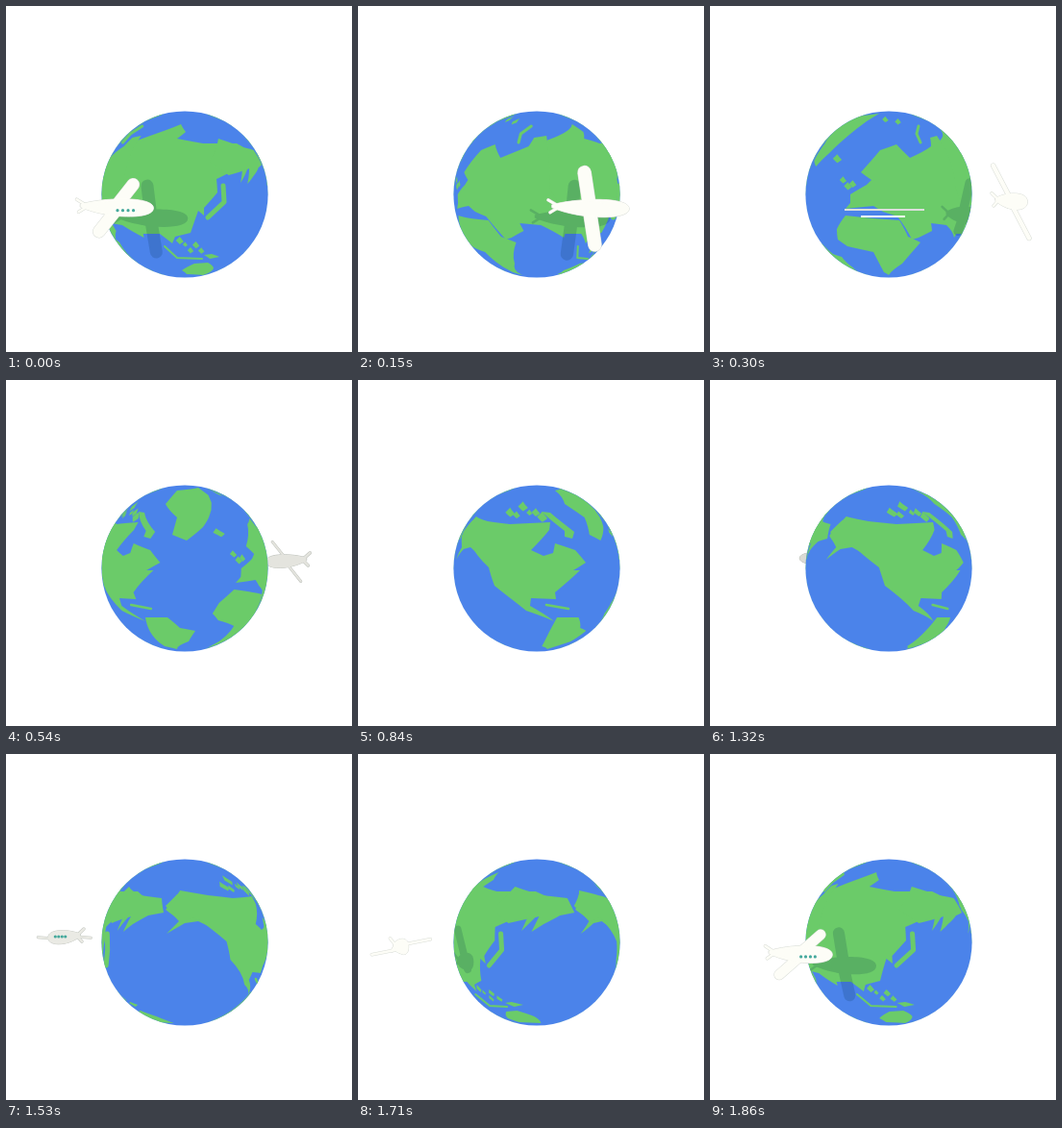
Recreate the animation shown at these times as an HTML page with a canvas. Size 360x360 px, loop 1890 ms.

```html
<!DOCTYPE html>
<html lang="en">
<head>
<meta charset="utf-8">
<title>Plane around the globe</title>
<style>
html, body { margin: 0; width: 100%; height: 100%; overflow: hidden; background: #fff; }
canvas { display: block; }
</style>
</head>
<body>
<canvas id="stage" width="360" height="360"></canvas>
<script>
const ctx = document.getElementById('stage').getContext('2d');
const layer = document.createElement('canvas');
layer.width = layer.height = 360;
const shadowCtx = layer.getContext('2d');

const CX = 186, CY = 196, R = 86.6, RAD = Math.PI / 180, TAU = 2 * Math.PI;
const SEA = '#4b83ea', LAND = '#6bcb69';
const STEP = 30, SLOTS = 63, POSES = 53;

// Camera distance in globe radii, and the angle at which the limb hides the surface.
const DIST = 12, LENS = Math.sqrt(DIST * DIST - 1), LIMB = Math.acos(1 / DIST);

// One eased turn per loop drives both the globe and the plane.
const turn = n => 180 * (1 - Math.cos(Math.PI * ((n + 22.5) % POSES) / POSES));
const viewAt = n => -107 - turn(n);
const orbitAt = n => (turn(n) - 167) * RAD;

const half = y => Math.sqrt(Math.max(1, R * R - (y - CY) ** 2));

function project(lon, y) {
  const a = Math.max(-LIMB, Math.min(LIMB, lon * RAD));
  return [CX + half(y) * Math.sin(a) * LENS / (DIST - Math.cos(a)), y];
}

function unproject(x, y) {
  const s = Math.max(-1, Math.min(1, (x - CX) / half(y)));
  const sine = Math.min(1, Math.abs(s) * DIST / Math.hypot(LENS, s));
  return [(Math.sign(s) * Math.asin(sine) - Math.atan2(s, LENS)) / RAD, y];
}

// Points drawn as they look at pose n become [longitude, y] pairs.
function trace(n, flat) {
  const out = [];
  for (let i = 0; i < flat.length; i += 2) {
    const [lon, y] = unproject(flat[i], flat[i + 1]);
    out.push([lon + viewAt(n), y]);
  }
  return out;
}

let seed = 7;
const random = () => (seed = seed * 16807 % 2147483647) / 2147483647;

// Small four-sided islands spread over a box.
function islands(n, x, y, w, h, count, size) {
  return Array.from({ length: count }, (_, i) => {
    const px = x + w * (i + .5) / count, py = y + h * random();
    const r = size * (.6 + .6 * random());
    return trace(n, [px - r, py, px, py - r, px + r, py + r * .3, px, py + r]);
  });
}

const ASIA = 0, EUROPE = 9, ATLANTIC = 16, AMERICA = 24, PACIFIC = 43;

const lands = [
  // Asia
  trace(ASIA, [118,150, 134,141, 150,135, 182,123, 187,131, 178,138, 205,143, 240,143, 260,156,
    251,170, 244,184, 246,167, 233,173, 219,180, 220,194, 206,210, 206,218, 200,213, 192,236,
    176,240, 173,247, 160,237, 140,237, 112,222, 106,198]),
  // Europe, Arabia and India
  trace(EUROPE, [146,205, 146,196, 163,186, 168,181, 157,173, 177,150, 194,144, 208,158, 230,146,
    229,137, 236,135, 256,190, 262,225, 254,241, 246,228, 230,226, 231,234, 217,241, 210,243,
    195,219, 180,214, 170,208, 141,211]),
  // Africa
  trace(EUROPE, [141,218, 170,221, 197,223, 206,240, 219,246, 200,268, 186,280, 181,277, 170,256,
    143,250, 133,243, 132,232]),
  // Greenland
  trace(ATLANTIC, [166,129, 178,115, 200,112, 211,143, 205,153, 188,167, 173,161, 178,143]),
  // South America
  trace(ATLANTIC, [145,247, 168,247, 181,258, 197,261, 190,272, 178,280, 165,277, 150,262]),
  // North America
  trace(AMERICA, [108,162, 123,142, 135,147, 158,150, 200,148, 199,156, 180,177, 193,183,
    203,180, 205,170, 226,177, 237,190, 224,198, 231,198, 205,221, 206,228, 180,227, 179,235,
    204,251, 175,240, 142,214, 136,195, 117,170, 109,174]),
  // Alaska
  trace(PACIFIC, [166,158, 178,146, 225,150, 236,192, 200,174, 186,176, 167,187, 180,174]),
  // Eastern Siberia
  trace(PACIFIC, [108,162, 128,138, 140,147, 162,150, 164,165, 148,168, 132,177, 122,185, 130,169,
    110,176]),
  // Baffin Island
  trace(AMERICA, [191,137, 200,138, 225,158, 223,165, 215,163, 215,157]),
  // Australia and New Guinea
  trace(ASIA, [183,275, 196,268, 210,267, 216,273, 205,280, 188,279]),
  trace(ASIA, [206,259, 214,258, 222,261, 212,263]),
  ...islands(ASIA, 178, 244, 28, 14, 5, 3.5),
  ...islands(AMERICA, 155, 124, 40, 20, 6, 5),
  ...islands(EUROPE, 136, 180, 15, 8, 3, 4),
  ...islands(EUROPE, 128, 156, 9, 3, 1, 4),
  ...islands(EUROPE, 176, 116, 26, 5, 2, 4)
];

const strips = [
  [5, trace(ASIA, [226,187, 227,204, 210,220])],
  [2, trace(ASIA, [165,250, 178,262, 204,263])],
  [3, trace(EUROPE, [217,125, 215,133, 219,142])],
  [2.5, trace(AMERICA, [196,234, 219,238])]
];

function fillLand(points, shift) {
  ctx.beginPath();
  points.forEach(([lon, y], i) => {
    const [lon2, y2] = points[(i + 1) % points.length];
    for (let f = 0; f < 1; f += .25) {
      ctx.lineTo(...project(lon + (lon2 - lon) * f + shift, y + (y2 - y) * f));
    }
  });
  ctx.fill();
}

function strokeStrip(width, points, shift) {
  if (points.some(p => Math.abs(p[0] + shift) * RAD > LIMB)) return;
  ctx.lineWidth = width;
  ctx.beginPath();
  points.forEach(([lon, y]) => ctx.lineTo(...project(lon + shift, y)));
  ctx.stroke();
}

// Shape of the plane at orbit angle a; a = 0 is in front, flying right.
function planePose(a) {
  const c = Math.cos(a), near = 1 + .2 * c;
  const up = [5 - 26 * Math.sin(a), -19 - 20 * Math.cos(a - Math.PI / 4)];
  return {
    x: 184 + 142 * Math.sin(a), y: 198 + 14 * c,
    nose: 38 * c * near, h: 8.5 * near,
    up, down: up.map(v => -v),
    wing: 2 + 14 * Math.max(0, c) ** 2
  };
}

function shadowPose(a) {
  const c = Math.cos(a), lean = 8 * Math.sin(a);
  return {
    x: 190 + 80 * Math.sin(a), y: 215 + 7 * c,
    nose: 44 * c, h: 10,
    up: [lean, -34], down: [-lean * 1.6 * c, 40 * c],
    wing: 6 + 8 * c
  };
}

function silhouette(c, pose, color, grow) {
  const { x, y, nose, h, up, down, wing } = pose;
  const tail = -.95 * nose, dir = Math.sign(tail);
  const bar = (x1, y1, x2, y2, w) => {
    c.lineWidth = w + grow;
    c.beginPath();
    c.moveTo(x + x1, y + y1);
    c.lineTo(x + x2, y + y2);
    c.stroke();
  };
  const blob = () => {
    c.fill();
    c.lineWidth = grow || .01;
    c.stroke();
  };
  c.fillStyle = c.strokeStyle = color;
  c.lineCap = c.lineJoin = 'round';
  bar(0, -2, ...up, wing);
  bar(0, 2, ...down, wing);
  bar(tail * .8, -2, tail + 4 * dir, -9, 2.5);
  bar(tail * .8, -2, tail + 2 * dir, 4, 2.5);
  c.beginPath();
  c.moveTo(x + tail, y - 4);
  c.bezierCurveTo(x + tail * .4, y - h * 1.1, x + nose, y - h * 1.3, x + nose, y);
  c.bezierCurveTo(x + nose, y + h * 1.3, x + tail * .3, y + h * 1.1, x + tail, y - 1);
  c.closePath();
  blob();
  c.beginPath();
  c.ellipse(x, y, Math.max(Math.abs(nose) * .5, h * .8), h * .75, 0, 0, TAU);
  blob();
}

function drawPlane(a) {
  const pose = planePose(a), { x, y, nose } = pose;
  const v = Math.round(253 + 38 * Math.min(0, Math.cos(a)));
  silhouette(ctx, pose, `rgb(${v - 36},${v - 32},${v - 38})`, 1);
  silhouette(ctx, pose, `rgb(${v},${v},${v - 6})`, 0);
  if (Math.sin(a) > .4 || Math.abs(nose) < 12) return;
  const gap = 3 + nose * nose / 600;
  ctx.fillStyle = '#45a99c';
  for (let i = 0; i < 4; i++) {
    ctx.beginPath();
    ctx.arc(x + nose * .25 + (i - 1.5) * gap, y + nose / 16, 1.6, 0, TAU);
    ctx.fill();
  }
}

function drawGlobe(n, a) {
  ctx.save();
  ctx.beginPath();
  ctx.arc(CX, CY, R, 0, TAU);
  ctx.fillStyle = SEA;
  ctx.fill();
  ctx.clip();
  ctx.fillStyle = ctx.strokeStyle = LAND;
  ctx.lineCap = ctx.lineJoin = 'round';
  for (let k = -1; k <= 1; k++) {
    const shift = 360 * k - viewAt(n);
    lands.forEach(p => fillLand(p, shift));
    strips.forEach(([w, p]) => strokeStrip(w, p, shift));
  }
  if (Math.cos(a) > 0) {
    shadowCtx.clearRect(0, 0, 360, 360);
    silhouette(shadowCtx, shadowPose(a), '#00304a', 0);
    ctx.globalAlpha = .17;
    ctx.drawImage(layer, 0, 0);
  }
  ctx.restore();
}

// Two short wind streaks while the plane leaves to the right.
function drawStreaks(n) {
  const k = n - 9;
  if (Math.abs(k) > 2) return;
  const streak = (from, to, y, color) => {
    ctx.fillStyle = color;
    ctx.fillRect(from + 12 * k, y - 1, to - from - 10 * k, 2);
  };
  streak(140, 223, 212, '#dcdfdc');
  streak(157, 203, 219, '#fff');
}

function draw(now) {
  const slot = Math.floor(now / STEP) % SLOTS;
  const n = slot ? Math.floor(slot * 5 / 6) + 1 : 0;
  const a = orbitAt(n), behind = Math.cos(a) < 0;
  ctx.fillStyle = '#fff';
  ctx.fillRect(0, 0, 360, 360);
  if (behind) drawPlane(a);
  drawGlobe(n, a);
  drawStreaks(n);
  if (!behind) drawPlane(a);
}

const start = performance.now();
function tick() {
  draw(performance.now() - start);
  requestAnimationFrame(tick);
}
tick();
</script>
</body>
</html>
```
